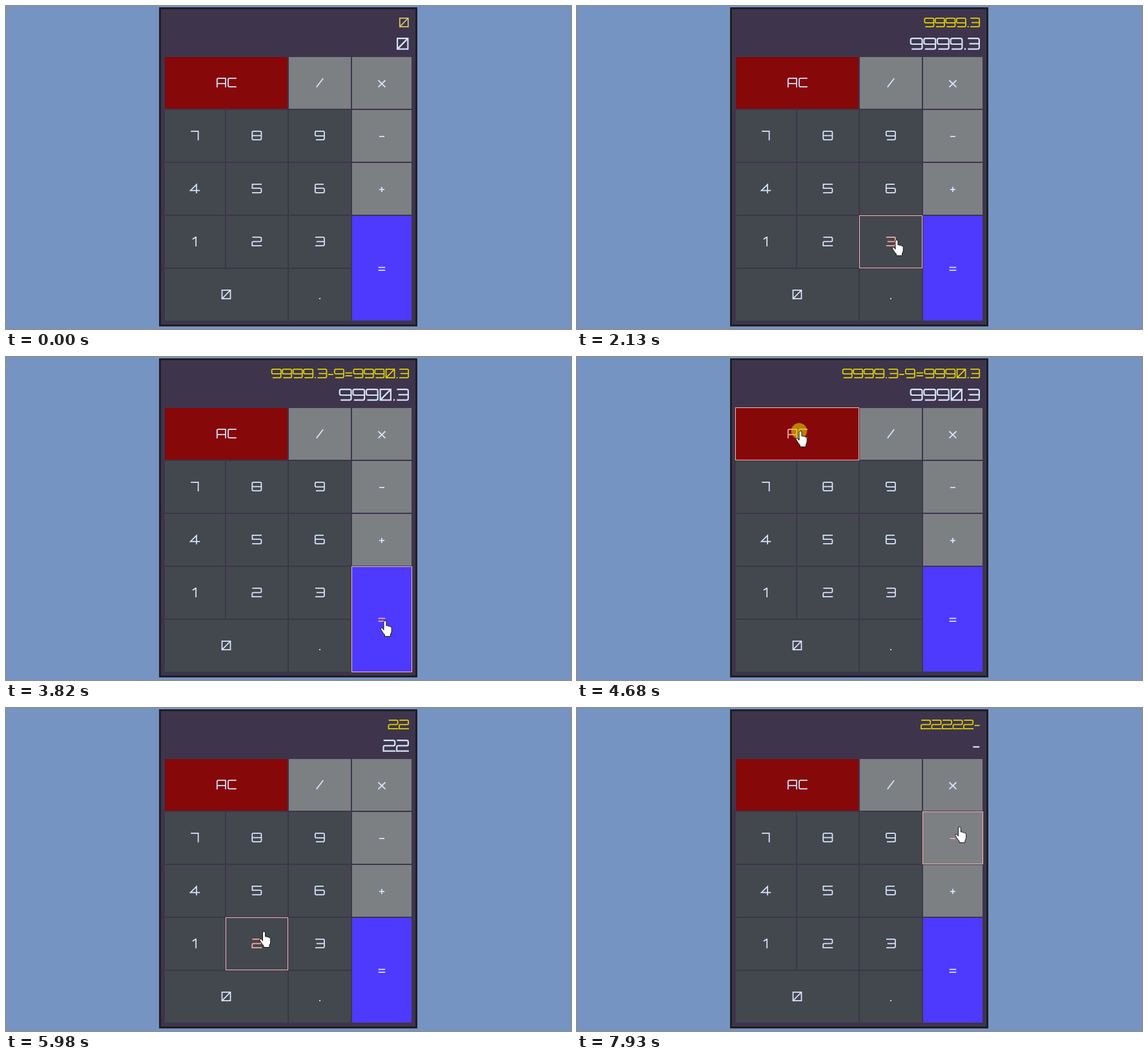
These frames come from a looping animation (875x500 px, 8000 ms). An HTML page:

```html
<!DOCTYPE html>
<html lang="en">
<head>
<meta charset="utf-8">
<title>Calculator</title>
<style>
  html, body { margin: 0; width: 100%; height: 100%; overflow: hidden; background: #7694c1; }
  svg { display: block; width: 875px; height: 500px; }
  .glyphs { fill: none; stroke: #d6e4ff; stroke-width: 1.75; }
  .edge { fill: none; stroke: none; }
  .hot .edge { stroke: #ffb5ab; }
  .hot .glyphs { stroke: #ffa59e; }
</style>
</head>
<body>
<svg id="stage" viewBox="0 0 875 500">
  <rect width="875" height="500" fill="#7694c1"/>
  <rect x="238.5" y="3.5" width="397" height="491" fill="#3e354c" stroke="#1e1f23" stroke-width="3"/>
  <g id="keys"></g>
  <g id="small" class="glyphs" role="img"></g>
  <g id="large" class="glyphs" role="img"></g>
  <circle id="press" r="12.2" fill="#dcd200" fill-opacity=".6"/>
  <path id="hand" fill="#fff" stroke="#15151a" stroke-width="1" stroke-linejoin="round"
    d="M0 2Q0 0 2 0T4 2V8Q5.5 7 7 8.6Q8.600 7.800 9.800 9.400Q12.200 9 12.200 11.500V16.500Q12 19 10.500 21V24.500H1.500V22Q-1 19.500-2.600 16.500L-4.700 13.200Q-5 11.300-3.400 11.300T0 14.400Z"/>
</svg>
<script>
const $ = id => document.getElementById(id);

// Stroke font: [advance, path], 15 units tall.
const FONT = {
  0: [16.5, 'M1.800 .9H14.800V14.100H1.800ZM1.800 14.100L14.800 .9'],
  1: [9, 'M1 4L5.600 .9H6.200V15'],
  2: [16.5, 'M1.200 .9H13.200q2 0 2 2v2.800q0 1.800-2 1.800H3q-2 0-2 2v4.600H16'],
  3: [16.5, 'M1.200 .9h12q2 0 2 2v9.200q0 2-2 2h-12M3 7.500H15'],
  4: [16.5, 'M10.800 15V1.300L1.400 10.700H16'],
  5: [16.5, 'M15.800 .9H1.200V7h12q2 0 2 2v3.100q0 2-2 2H.8'],
  6: [16.5, 'M14.200 .9H3q-2 0-2 2v9.200q0 2 2 2h10.200q2 0 2-2V9q0-2-2-2H1'],
  7: [14, 'M.8 .9H12.200V15'],
  8: [16.5, 'M3 .9h10.200q2 0 2 2v9.200q0 2-2 2H3q-2 0-2-2V2.900q0-2 2-2M1 7.500H15.200'],
  9: [16.5, 'M15.200 8H3q-2 0-2-2V2.900q0-2 2-2h10.200q2 0 2 2v9.200q0 2-2 2H2.200'],
  A: [16.6, 'M1.700 15V2.900q0-2 2-2H14.900V15M1.700 9H14.900'],
  C: [15, 'M15 .9H4.300q-2 0-2 2v9.200q0 2 2 2H15'],
  '/': [12, 'M.8 14.600L11.200 1'],
  x: [13, 'M1 4L12 14.700M12 4L1 14.700'],
  '-': [10, 'M1 9H9'],
  '+': [9, 'M.5 9h8M4.500 5v8'],
  '=': [13, 'M1.200 6.500H11.800M1.200 11H11.800'],
  '.': [4.7, 'M2.400 13v2']
};

const widthOf = s => [...s].reduce((w, c) => w + FONT[c][0], 0);

function glyphs(s, x, y, scale, lastColor) {
  let at = 0;
  const parts = [...s].map((c, i) => {
    const tint = lastColor && i === s.length - 1 ? ` stroke="${lastColor}"` : '';
    const out = `<path d="${FONT[c][1]}" transform="translate(${at})"${tint}/>`;
    at += FONT[c][0];
    return out;
  });
  return `<g transform="translate(${x} ${y}) scale(${scale})">${parts.join('')}</g>`;
}

// Key grid: label, columns, rows, colour
const COLS = [[246, 339], [341, 436], [438, 534], [536, 628]];
const DARK = '#43484e', GREY = '#7d8083';
const KEYS = [
  ['AC', 0, 1, 0, 0, '#860809'], ['/', 2, 2, 0, 0, GREY], ['x', 3, 3, 0, 0, GREY],
  ['7', 0, 0, 1, 1, DARK], ['8', 1, 1, 1, 1, DARK], ['9', 2, 2, 1, 1, DARK], ['-', 3, 3, 1, 1, GREY],
  ['4', 0, 0, 2, 2, DARK], ['5', 1, 1, 2, 2, DARK], ['6', 2, 2, 2, 2, DARK], ['+', 3, 3, 2, 2, GREY],
  ['1', 0, 0, 3, 3, DARK], ['2', 1, 1, 3, 3, DARK], ['3', 2, 2, 3, 3, DARK], ['=', 3, 3, 3, 4, '#4e3aff'],
  ['0', 0, 1, 4, 4, DARK], ['.', 2, 2, 4, 4, DARK]
].map(([label, c0, c1, r0, r1, color]) => {
  const x = COLS[c0][0], w = COLS[c1][1] - x;
  const y = 79 + 82 * r0, h = 82 * (r1 - r0) + 80;
  return { label, x, y, w, h, color };
});

$('keys').innerHTML = KEYS.map(k => `
  <g role="img" aria-label="${k.label}">
    <rect x="${k.x}" y="${k.y}" width="${k.w}" height="${k.h}" fill="${k.color}"/>
    <rect class="edge" x="${k.x - .5}" y="${k.y - .5}" width="${k.w + 1}" height="${k.h + 1}"/>
    <g class="glyphs">${glyphs(k.label, k.x + k.w / 2 - widthOf(k.label) / 2, k.y + k.h / 2 - 8, 1)}</g>
  </g>`).join('');
const nodes = [...$('keys').children];

// Pointer stops: time, x, y
const PATH = [
  [70, 631, 420], [310, 468, 185], [1130, 468, 185], [1440, 488, 475], [1670, 488, 474],
  [1900, 493, 362], [2210, 493, 362], [2400, 600, 278], [2590, 590, 190], [2820, 590, 190],
  [3050, 503.5, 191], [3360, 503.5, 191], [3590, 585, 408], [3960, 585, 408],
  [4360, 344, 114.5], [4900, 344, 114.5], [5280, 397.5, 346], [6490, 397.5, 346],
  [6750, 480, 440], [7150, 480, 440], [7690, 590.5, 184], [8000, 590.5, 184]
];

// Button down, button up, small line, large line
const CLICKS = [
  [310, 390, '9', '9'], [490, 570, '99', '99'], [670, 750, '999', '999'], [870, 980, '9999', '9999'],
  [1520, 1600, '9999.', '9999.'], [1980, 2060, '9999.3', '9999.3'],
  [2670, 2750, '9999.3-', '-'], [3200, 3280, '9999.3-9', '9'],
  [3670, 3820, '9999.3-9=9990.3', '9990.3'], [4680, 4760, '0', '0'],
  [5520, 5680, '2', '2'], [5820, 5900, '22', '22'], [6050, 6130, '222', '222'],
  [6210, 6290, '2222', '2222'], [6370, 6450, '22222', '22222'],
  [6990, 7070, '22222.', '22222.'], [7760, 7930, '22222-', '-']
];

function pointer(t) {
  const held = Math.floor((t + 25) / 76.92) * 76.92;
  const i = PATH.findIndex(p => p[0] > held);
  if (i < 0) return PATH[PATH.length - 1].slice(1);
  if (i === 0) return PATH[0].slice(1);
  const [t0, x0, y0] = PATH[i - 1], [t1, x1, y1] = PATH[i];
  const u = (held - t0) / (t1 - t0), e = u * u * (3 - 2 * u);
  return [x0 + (x1 - x0) * e, y0 + (y1 - y0) * e];
}

let shown = '';
function display(small, large, pale) {
  const key = small + '|' + large + pale;
  if (key === shown) return;
  shown = key;
  $('small').innerHTML = glyphs(small, 624.5 - widthOf(small), 18, 1, pale ? '#d5c56c' : '');
  $('large').innerHTML = glyphs(large, 624.5 - widthOf(large) * 1.25, 49, 1.25);
  $('small').setAttribute('aria-label', small);
  $('large').setAttribute('aria-label', large);
}
$('small').style.stroke = '#dfd000';

function draw(t) {
  const done = CLICKS.filter(c => t >= c[1]).pop();
  display(done ? done[2] : '0', done ? done[3] : '0', t < 1600);

  const visible = t >= 70;
  const [x, y] = pointer(t);
  const over = visible ? KEYS.findIndex(k =>
    x >= k.x - 1 && x < k.x + k.w + 1 && y >= k.y - 1 && y < k.y + k.h + 1) : -1;
  nodes.forEach((n, i) => n.classList.toggle('hot', i === over));

  const at = `translate(${x.toFixed(1)} ${y.toFixed(1)})`;
  const down = CLICKS.some(c => t >= c[0] && t < c[1]);
  $('press').setAttribute('transform', at);
  $('press').setAttribute('visibility', down ? 'visible' : 'hidden');
  $('hand').setAttribute('transform', at);
  $('hand').setAttribute('visibility', visible ? 'visible' : 'hidden');
}

const start = performance.now();
function tick() {
  draw((performance.now() - start) % 8000);
  requestAnimationFrame(tick);
}
tick();
</script>
</body>
</html>
```
